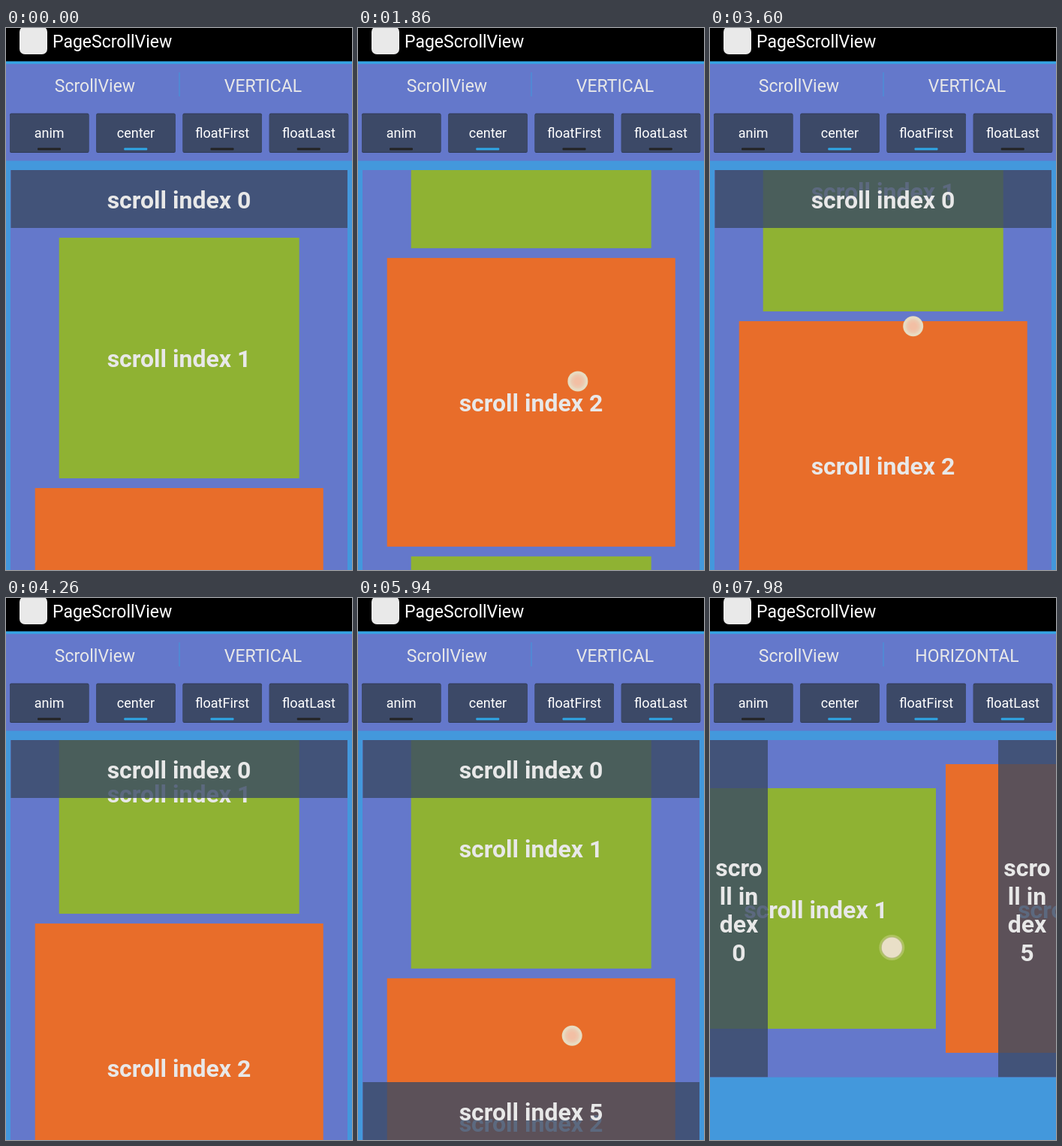
These frames come from a looping animation (461 px wide and 721 px high, 8 s). An HTML page with a canvas:

```html
<!DOCTYPE html>
<html lang="en">
<head>
<meta charset="utf-8">
<title>PageScrollView</title>
<style>
  html, body { margin: 0; width: 100%; height: 100%; overflow: hidden; background: #4398dc; }
  canvas { display: block; width: 461px; height: 721px; }
</style>
</head>
<body>
<canvas id="stage" width="461" height="721"></canvas>
<script>
const W = 461, H = 721, LOOP = 8000, STEP = 60;
const ctx = document.getElementById('stage').getContext('2d');

const PANEL = '#6478cb', EDGE = '#4398dc', GREEN = '#8fb233', ORANGE = '#e86d2a';
const SLATE = 'rgba(58,74,102,0.8)', TEXT = '#e8e8e8', ACCENT = '#2fa8e8';
const TOP = 189, BAR = 77, GAP = 13, DEPTH = 448.5;
const FIRST_ON = 2520, LAST_ON = 4680, TURN = 7320;
const TAP = 240, PRESS = 120;   // tap length, delay before it takes effect

const items = [];
for (const size of [BAR, 320, 384, 320, 384, BAR]) {
  const last = items[items.length - 1];
  items.push({ size, pos: last ? last.pos + last.size + GAP : 0 });
}

const buttons = [
  { label: 'anim' },
  { label: 'center', on: 0 },
  { label: 'floatFirst', on: FIRST_ON },
  { label: 'floatLast', on: LAST_ON }
];

// Each swipe scrolls on from where the previous one stopped; the finger starts at x, y.
const swipes = [
  { start: 720, lift: 900, end: 1260, to: 506, x: 298, y: 640 },
  { start: 1740, lift: 2040, end: 2280, to: 0, x: 298, y: 250 },
  { start: 3000, lift: 3780, end: 3780, to: 234.5, x: 283, y: 641 },
  { start: 3840, lift: 4200, end: 4260, to: 179, x: 270, y: 383 },
  { start: 5340, lift: 6180, end: 6120, to: 102, x: 297.5, y: 502 },
  { start: 7920, lift: 7980, end: 7980, to: 109, x: 250, y: 465 }
];
swipes.forEach((s, i) => { s.from = i ? swipes[i - 1].to : 0; });

const taps = [
  { start: FIRST_ON - PRESS, x: 295, y: 140 },
  { start: LAST_ON - PRESS, x: 405, y: 140 },
  { start: TURN - PRESS, x: 343, y: 78 }
];

const clamp = v => Math.min(1, Math.max(0, v));
const easeOut = p => 1 - (1 - p) ** 2;
const progress = ({ start, end }, t) => easeOut(clamp((t - start) / (end - start)));
const scrollAt = t => swipes.reduce((sum, s) => sum + (s.to - s.from) * progress(s, t), 0);

function rect(x, y, w, h, color) {
  ctx.fillStyle = color;
  ctx.fillRect(x, y, w, h);
}

function round(x, y, w, h, r, color) {
  ctx.fillStyle = color;
  ctx.beginPath();
  ctx.roundRect(x, y, w, h, r);
  ctx.fill();
}

function disc(x, y, r, color) {
  ctx.fillStyle = color;
  ctx.beginPath();
  ctx.arc(x, y, r, 0, Math.PI * 2);
  ctx.fill();
}

function text(str, x, y, size, color = TEXT, weight = 400, align = 'center') {
  ctx.font = `${weight} ${size}px Roboto, sans-serif`;
  ctx.textAlign = align;
  ctx.fillStyle = color;
  ctx.fillText(str, x, y);
}

function drawHeader(t) {
  rect(0, 0, W, 44.5, '#000');
  round(18, -2, 37, 37, 7, '#e9e9e9');
  text('PageScrollView', 62, 26, 23, '#fff', 400, 'left');
  rect(0, 47.5, W, 129, PANEL);
  rect(0, 44.5, W, 3, '#35a5e5');
  rect(230.5, 59, 1, 32, '#3f97de');
  text('ScrollView', 118.5, 85, 23);
  text(t < TURN ? 'VERTICAL' : 'HORIZONTAL', 342.5, 85, 23);
  buttons.forEach((b, i) => drawButton(b, 5 + i * 115.25, t));
}

function drawButton({ label, on }, x, t) {
  const pressed = on && t >= on - PRESS && t < on;
  round(x, 113.5, 105.5, 52.5, 2, '#303b56');
  round(x, 114.5, 105.5, 50.5, 2, pressed ? '#44638c' : '#3c4967');
  text(label, x + 52.7, 146, 18, '#fff');
  round(x + 37, 159.5, 31, 3, 1, t >= on ? ACCENT : '#222');
}

function drawItem(i, pos, vertical) {
  const { size } = items[i], bar = size === BAR;
  const color = bar ? SLATE : size === 320 ? GREEN : ORANGE;
  const cross = bar ? DEPTH : size;
  const label = 'scroll index ' + i;
  const mid = pos + size / 2;
  if (vertical) {
    rect(230.7 - cross / 2, pos, cross, size, color);
    text(label, 230.5, mid + 12, 32, TEXT, 700);
    return;
  }
  rect(pos, bar ? TOP : 413 - cross / 2, size, cross, color);
  if (bar) {
    ['scro', 'll in', 'dex', String(i)].forEach((line, n) =>
      text(line, mid, 370 + n * 37.5, 32, TEXT, 700));
  } else {
    text(label, mid, 426, 32, TEXT, 700);
  }
}

function drawList(t) {
  const vertical = t < TURN, scroll = scrollAt(t);
  const start = vertical ? TOP : 0, end = vertical ? H : W;
  const pinFirst = t >= FIRST_ON, pinLast = t >= LAST_ON;
  rect(0, 176.5, W, H - 176.5, EDGE);
  ctx.save();
  ctx.beginPath();
  if (vertical) ctx.rect(6, TOP, 449, H - TOP);
  else ctx.rect(0, TOP, W, DEPTH);
  ctx.clip();
  rect(0, TOP, W, H, PANEL);
  items.forEach(({ pos, size }, i) => {
    if ((i === 0 && pinFirst) || (i === 5 && pinLast)) return;
    const p = start + pos - scroll;
    if (p < end && p + size > start) drawItem(i, p, vertical);
  });
  if (pinFirst) drawItem(0, start, vertical);
  if (pinLast) drawItem(5, end - BAR, vertical);
  ctx.restore();
}

function drawSwipe(s, t) {
  if (t < s.start || t > s.lift) return;
  const p = progress(s, t);
  const travel = 1.1 * (s.to - s.from) * p;   // slightly more than the list moves
  if (t < TURN) {
    const x = s.x - 13 * p, y = s.y - travel;
    const g = ctx.createRadialGradient(x, y, 4, x, y, 13.5);
    g.addColorStop(0, '#f2bfa4');
    g.addColorStop(0.45, '#eccab0');
    g.addColorStop(0.75, '#e8dcc4');
    g.addColorStop(1, '#e6dbbd');
    disc(x, y, 13.5, g);
  } else {
    const x = s.x - travel;
    disc(x, s.y, 17, 'rgba(210,215,150,0.45)');
    disc(x, s.y, 14.5, '#b5bb80');
    disc(x, s.y, 13.5, '#e9dfc7');
  }
}

function drawTap({ start, x, y }, t) {
  const p = (t - start) / TAP;
  if (p < 0 || p > 1) return;
  ctx.globalAlpha = 1 - 0.7 * p;
  disc(x, y, 14 + 5 * p, '#e6dfd0');
  ctx.globalAlpha = 1;
}

function draw(now) {
  const t = Math.floor((now % LOOP) / STEP) * STEP;
  drawList(t);
  drawHeader(t);
  for (const s of swipes) drawSwipe(s, t);
  for (const tap of taps) drawTap(tap, t);
}

const began = performance.now();
function tick() {
  draw(performance.now() - began);
  requestAnimationFrame(tick);
}
tick();
</script>
</body>
</html>
```
